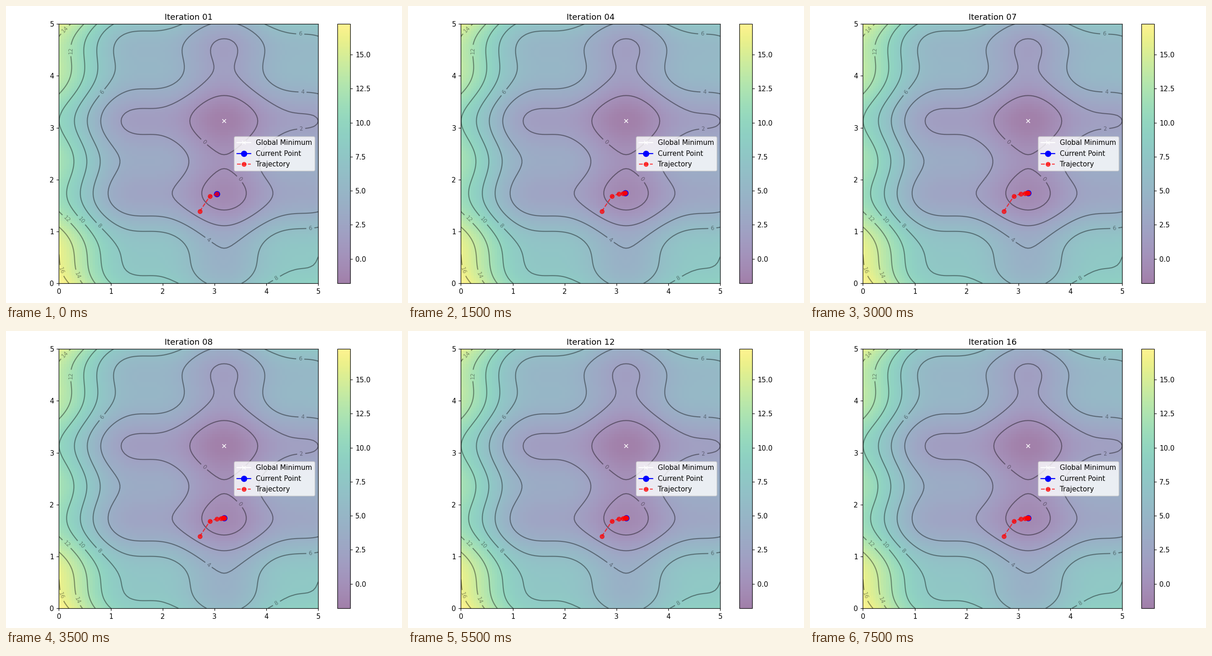
Recreate the animation shown at these times as a matplotlib script. Size 864 by 648 pixels, loop 8000 ms.

```python
import numpy as np
import matplotlib.pyplot as plt
from matplotlib.animation import FuncAnimation

W, H, DPI = 864, 648, 108
FRAMES, INTERVAL = 16, 500
RATE = 0.05
START = (2.717, 1.392)
LEFT, TOP, RIGHT, BOTTOM = 115.38, 39.2, 681.48, 605.3
UNIT = (RIGHT - LEFT) / 5


def f(x, y):
    return ((x - 3.14) ** 2 + (y - 2.72) ** 2
            + np.sin(3 * x + 1.41) + np.sin(4 * y - 1.73))


def grad(p):
    x, y = p
    return np.array([2 * (x - 3.14) + 3 * np.cos(3 * x + 1.41),
                     2 * (y - 2.72) + 4 * np.cos(4 * y - 1.73)])


def descend(start, steps):
    path = [np.array(start)]
    for _ in range(steps):
        path.append(path[-1] - RATE * grad(path[-1]))
    return np.array(path)


def px_axes(fig, left, right):
    return fig.add_axes([left / W, 1 - BOTTOM / H,
                         (right - left) / W, (BOTTOM - TOP) / H])


plt.rcParams["font.family"] = "DejaVu Sans"
fig = plt.figure(figsize=(W / DPI, H / DPI), dpi=DPI, facecolor="white")
ax = px_axes(fig, LEFT, RIGHT)
cax = px_axes(fig, 723.06, 723.06 + (BOTTOM - TOP) / 20)

# Surface and its colour scale
grid = np.linspace(0, 5, 100)
x, y = np.meshgrid(grid, grid)
z = f(x, y)
img = ax.imshow(z, extent=[0, 5, 0, 5], origin="lower", cmap="viridis",
                alpha=0.5, aspect="auto")
fig.colorbar(img, cax=cax, ticks=np.arange(0, 16, 2.5))

# Contours, labelled at chosen spots (pixels from the top left)
lines = ax.contour(x, y, z, levels=np.arange(-2, 19, 2), colors="black",
                   alpha=0.4, linestyles="solid")
ax.set(xlim=(0, 5), ylim=(0, 5), xticks=range(6), yticks=range(6))
spots = [(122, 577), (157, 587), (127, 50), (140, 97), (133, 464), (165, 467),
         (205, 478), (590, 594), (208, 187), (642, 60), (664, 484), (647, 187),
         (442, 510), (644, 267), (433, 296), (511, 377)]
ax.clabel(lines, inline=True, fontsize=8, fmt="%.0f",
          manual=[((u - LEFT) / UNIT, (BOTTOM - v) / UNIT) for u, v in spots])

# Markers
low = np.unravel_index(z.argmin(), z.shape)
ax.plot(x[low], y[low], marker="x", markersize=5, color="white",
        label="Global Minimum")
point, = ax.plot([], [], "bo-", markersize=8, label="Current Point")
trail, = ax.plot([], [], "ro--", markersize=6, alpha=0.7, label="Trajectory")
ax.legend(loc="center right", labelspacing=0.57, borderpad=0.43,
          handletextpad=0.69)
title = ax.set_title("Iteration 01")

path = descend(START, FRAMES + 1)


def update(i):
    seen = path[:i + 3]
    trail.set_data(seen[:, 0], seen[:, 1])
    point.set_data(seen[-1:, 0], seen[-1:, 1])
    title.set_text(f"Iteration {i + 1:02d}")
    return point, trail, title


anim = FuncAnimation(fig, update, frames=FRAMES, interval=INTERVAL,
                     repeat=True, repeat_delay=0, blit=False)
plt.show()
```
